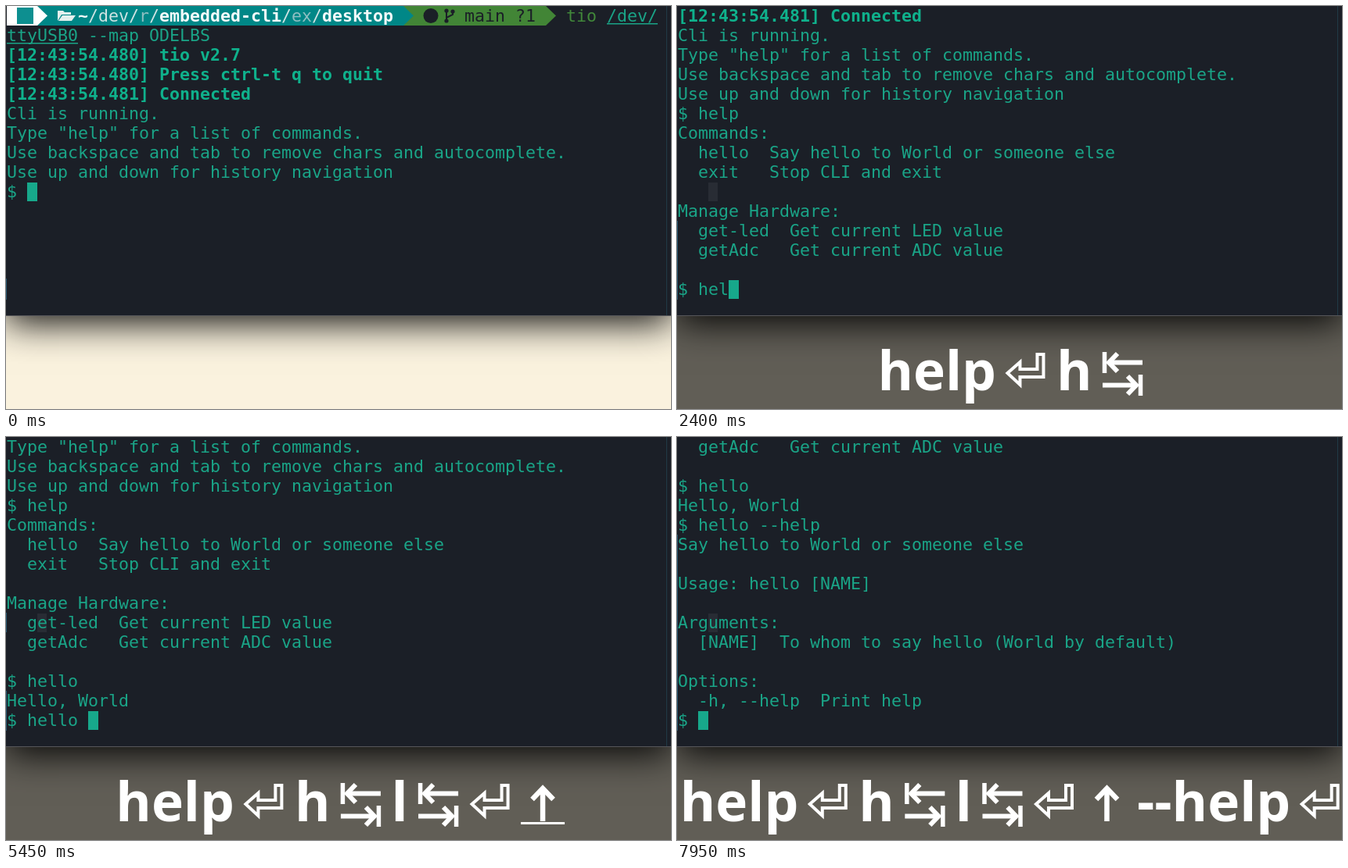
These frames come from a looping animation (850x516 px, 8 s). An HTML page with a canvas:

```html
<!DOCTYPE html>
<html lang="en">
<head>
<meta charset="utf-8">
<title>Terminal session</title>
<style>
  html, body { margin: 0; width: 100%; height: 100%; overflow: hidden; background: #faf2de; }
  canvas { display: block; width: 100vw; height: 100vh; }
</style>
</head>
<body>
<canvas id="stage" width="850" height="516"></canvas>
<script>
const ctx = document.getElementById('stage').getContext('2d');
const W = 850, H = 516, LOOP = 8000;
const CELL = 13, ROW = 25, LEFT = 1, ROWS = 15, TERM_H = 396;
const MONO = '21.593px "DejaVu Sans Mono", monospace';
const CAPTION = 'bold 69.33px "Noto Sans", "Open Sans", sans-serif';
const BG = '#1b1f27', FG = '#1aa487', BOLD = '#0fb18c', TEAL = '#008787', GREEN = '#428536';
const CENTER = 427.2, GAP = 10.5, BASE = 492;

const intro = [
  null,
  'ttyUSB0 --map ODELBS',
  '*[12:43:54.480] tio v2.7',
  '*[12:43:54.480] Press ctrl-t q to quit',
  '*[12:43:54.481] Connected',
  'Cli is running.',
  'Type "help" for a list of commands.',
  'Use backspace and tab to remove chars and autocomplete.',
  'Use up and down for history navigation'
];
const helpOut = [
  'Commands:',
  '  hello  Say hello to World or someone else',
  '  exit   Stop CLI and exit',
  '',
  'Manage Hardware:',
  '  get-led  Get current LED value',
  '  getAdc   Get current ADC value',
  ''
];
const helloHelpOut = [
  'Say hello to World or someone else',
  '',
  'Usage: hello [NAME]',
  '',
  'Arguments:',
  '  [NAME]  To whom to say hello (World by default)',
  '',
  'Options:',
  '  -h, --help  Print help'
];

// [time, key, prompt text afterwards, underline duration]
const keys = [
  [500, 'h', 'h'], [650, 'e', 'he'], [850, 'l', 'hel'], [1000, 'p', 'help'],
  [1300, 'enter', 'help', 350],
  [1900, 'h', 'h'], [2100, 'tab', 'hel', 300],
  [3350, 'l', 'hell'], [3550, 'tab', 'hello '],
  [4800, 'enter', 'hello ', 350],
  [5450, 'up', 'hello '],
  [6450, '-', 'hello -'], [6600, '-', 'hello --'],
  [6900, 'h', 'hello --h'], [7100, 'e', 'hello --he'],
  [7250, 'l', 'hello --hel'], [7400, 'p', 'hello --help'],
  [7600, 'enter', 'hello --help', 350]
];

// Command results, and the marks on the left edge that go with them
const runs = [
  { at: 0, lines: intro, marks: [[349, 376]] },
  { at: 1350, lines: ['$ help', ...helpOut], marks: [[275, 376]] },
  { at: 4850, lines: ['$ hello', 'Hello, World'], marks: [[225, 250], [325, 376]] },
  { at: 7650, lines: ['$ hello --help', ...helloHelpOut], marks: [[125, 376]] }
];

const colX = c => LEFT + c * CELL;

function rect(x, y, w, h, color) {
  ctx.fillStyle = color;
  ctx.fillRect(x, y, w, h);
}

function poly(points, color) {
  ctx.fillStyle = color;
  ctx.beginPath();
  points.forEach(([x, y]) => ctx.lineTo(x, y));
  ctx.fill();
}

function disc(x, y, r, color) {
  ctx.fillStyle = color;
  ctx.beginPath();
  ctx.arc(x, y, r, 0, Math.PI * 2);
  ctx.fill();
}

function stroke(points, width, close) {
  ctx.lineWidth = width;
  ctx.beginPath();
  points.forEach(([x, y]) => ctx.lineTo(x, y));
  if (close) ctx.closePath();
  ctx.stroke();
}

function print(text, col, row, color, bold) {
  ctx.font = (bold ? 'bold ' : '') + MONO;
  ctx.fillStyle = color;
  [...text].forEach((ch, i) => {
    if (ch !== ' ') ctx.fillText(ch, colX(col + i), row * ROW + 20);
  });
}

const arrow = (x, color) => poly([[x, 0], [x + CELL, 12.5], [x, 25]], color);

function drawPromptBar() {
  rect(colX(39), 0, colX(53) - colX(39), 25, GREEN);
  arrow(colX(53), GREEN);
  rect(colX(3), 0, colX(39) - colX(3), 25, TEAL);
  arrow(colX(39), TEAL);
  rect(LEFT, 0, colX(3) - LEFT, 25, '#ffffff');
  arrow(colX(3), '#ffffff');
  rect(14, 2, 21, 21, '#0d8f90');

  poly([[66, 19], [66, 6], [73, 6], [75, 8], [83, 8], [83, 11], [71, 11]], '#e4f0ee');
  poly([[72, 12], [89, 12], [84, 19], [67, 19]], '#e4f0ee');

  let col = 7;
  const parts = [['~', 2], ['/dev/', 1], ['r', 0], ['/', 1], ['embedded-cli', 2],
    ['/', 1], ['ex', 0], ['/', 1], ['desktop', 2]];
  for (const [text, level] of parts) {
    print(text, col, 0, ['#8fbfc2', '#cfe3e3', '#f2fafa'][level], level === 2);
    col += text.length;
  }

  disc(543, 12.5, 9.5, BG);
  ctx.strokeStyle = BG;
  stroke([[563, 6], [563, 19]], 2);
  stroke([[571, 8], [571, 11], [563, 15]], 2);
  disc(563, 6, 2.6, BG);
  disc(563, 19, 2.6, BG);
  disc(571, 7, 2.6, BG);
  print('main ?1', 45, 0, BG);

  print('tio', 55, 0, '#41883a');
  print('/dev/', 59, 0, FG);
  rect(colX(59), 22, 5 * CELL, 1.5, FG);
}

function drawTerminal(t) {
  rect(0, 0, W, TERM_H, BG);
  const done = runs.filter(r => t >= r.at);
  const last = done[done.length - 1];
  const typed = keys.filter(k => k[0] <= t && k[0] >= last.at).pop();
  const prompt = '$ ' + (typed ? typed[2] : '');
  const lines = [...done.flatMap(r => r.lines), prompt];
  const first = Math.max(0, lines.length - ROWS);

  if (t >= 700) rect(40, 226, 12, 24, '#282c34');
  lines.slice(first).forEach((line, row) => {
    if (line === null) return drawPromptBar();
    const bold = line[0] === '*';
    print(bold ? line.slice(1) : line, 0, row, bold ? BOLD : FG, bold);
    if (first + row === 1) rect(LEFT, 47, 7 * CELL, 1.5, FG);
  });
  rect(colX(prompt.length), (lines.length - 1 - first) * ROW + 1, CELL, 24, '#17a88b');

  for (const [top, bottom] of last.marks) rect(0, top, 1, bottom - top, '#285872');
  rect(844, 0, 1, TERM_H, '#203a46');
}

function drawDesk() {
  rect(0, TERM_H, W, H - TERM_H, '#faf2de');
  ctx.save();
  ctx.beginPath();
  ctx.rect(0, TERM_H, W, H - TERM_H);
  ctx.clip();
  ctx.shadowColor = 'rgba(0,0,0,0.95)';
  ctx.shadowBlur = 44;
  ctx.shadowOffsetY = 10;
  rect(0, 0, W, TERM_H, BG);
  ctx.restore();
  rect(0, TERM_H, W, 1, '#56565a');
}

// Key symbols, drawn from the left edge of their slot
const symbols = {
  enter: { width: 56, draw: x => stroke([[4, 470], [20, 456], [20, 465], [42, 465], [42, 446],
    [50, 446], [50, 475], [20, 475], [20, 485]].map(([a, y]) => [x + a, y]), 4, true) },
  tab: { width: 57, draw: x => {
    const half = (f, g) => {
      const place = pts => pts.map(([a, y]) => [x + f(a), g(y)]);
      stroke(place([[5.5, 443], [5.5, 470]]), 5.5);
      stroke(place([[10, 456.5], [54, 456.5]]), 6);
      stroke(place([[22, 445], [11, 456.5], [22, 468]]), 6);
    };
    half(a => a, y => y);
    half(a => 57 - a, y => 942 - y);
  } },
  up: { width: 56, draw: x => {
    stroke([[x + 28, 450], [x + 28, 492]], 6.5);
    stroke([[x + 14.5, 464], [x + 28, 450], [x + 41.5, 464]], 6.5);
  } }
};

function drawCaption(t) {
  if (t < keys[0][0]) return;
  const p = Math.min(1, (t - 500) / 300 + 0.05);
  const fade = 1 - (1 - p) ** 2;
  rect(0, TERM_H + 1, W, H - TERM_H - 1, `rgba(0,0,0,${0.61 * fade})`);

  ctx.save();
  ctx.globalAlpha = fade;
  ctx.font = CAPTION;
  ctx.fillStyle = ctx.strokeStyle = '#ffffff';
  const shown = keys.filter(k => k[0] <= t);
  let x = 0;
  const items = shown.map(([, key], i) => {
    const sym = symbols[key];
    if (i && (sym || symbols[shown[i - 1][1]])) x += GAP;
    const item = { key, sym, x, width: sym ? sym.width : ctx.measureText(key).width };
    x += item.width;
    return item;
  });
  const start = CENTER - x / 2;
  for (const item of items) {
    if (item.sym) item.sym.draw(start + item.x);
    else ctx.fillText(item.key, start + item.x, BASE);
  }

  const [at, , , hold = 250] = shown[shown.length - 1];
  if (t < at + hold) {
    const { sym, x: left, width } = items[items.length - 1];
    rect(start + left, sym ? 493 : 498, width, sym ? 3 : 3.5, '#ffffff');
  }
  ctx.restore();
}

function frame(now) {
  const t = now % LOOP;
  ctx.clearRect(0, 0, W, H);
  drawDesk();
  drawTerminal(t);
  drawCaption(t);
  requestAnimationFrame(frame);
}
requestAnimationFrame(frame);
</script>
</body>
</html>
```
